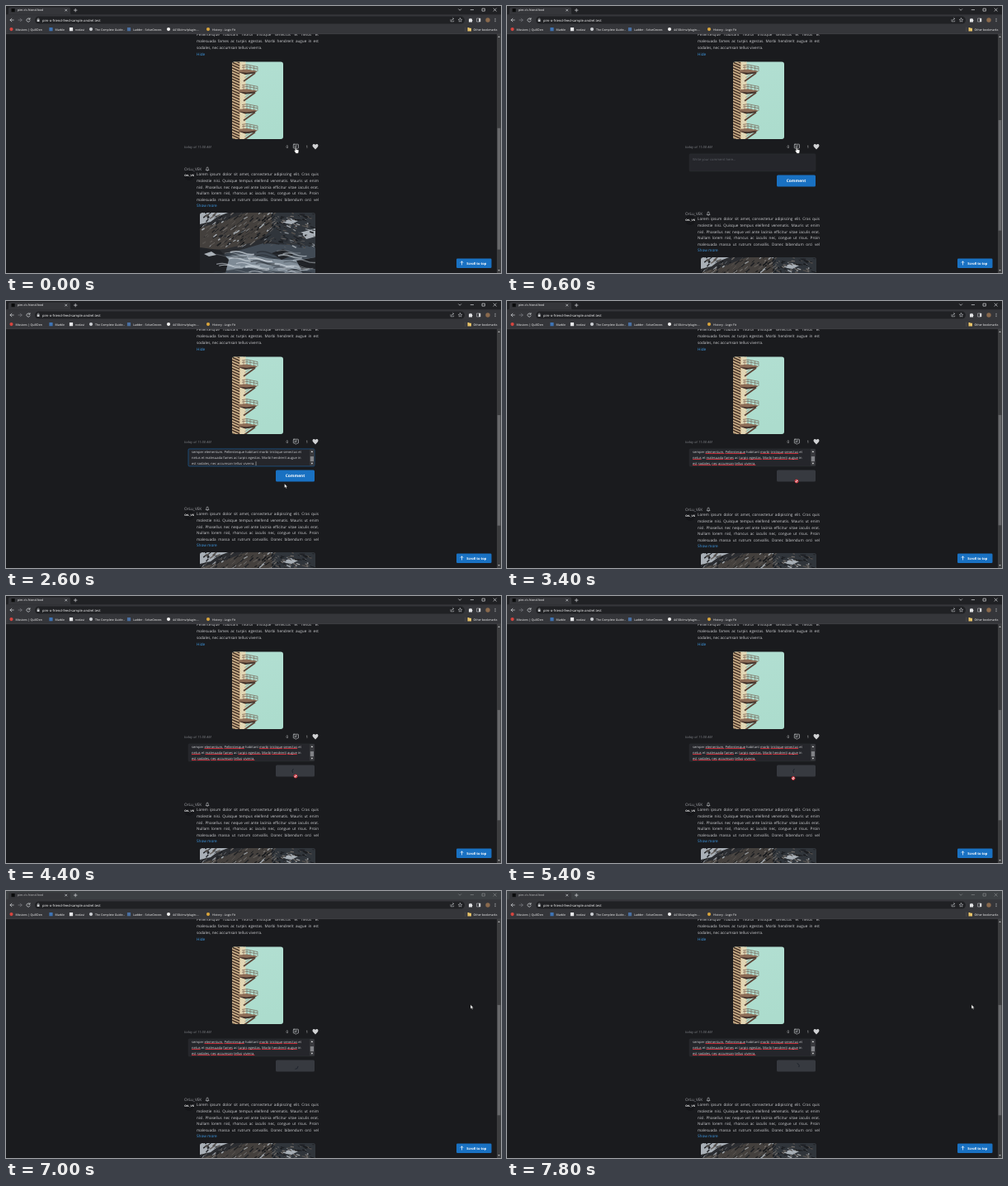
These frames come from a looping animation (600x323 px, 8 s). An HTML page:

```html
<!DOCTYPE html>
<html lang="en">
<head>
<meta charset="utf-8">
<title>Comment form</title>
<style>
  html, body { margin: 0; width: 100%; height: 100%; overflow: hidden; background: #1a1b1e; }
  svg { display: block; width: 600px; height: 323px; }
  svg, svg div { font-family: "Open Sans", "Noto Sans", sans-serif; font-weight: 500; text-rendering: geometricPrecision; }
  text { font-size: 4.1px; fill: #d0d1d4; white-space: pre; }
  foreignObject { overflow: visible; }
  .chrome text { font-size: 3.52px; fill: #fff; }
  .chrome .url { font-size: 4.1px; }
  .body { font-size: 4.7px; }
  .link { font-size: 4.7px; fill: #3f9be6; }
  .bold { font-weight: 700; fill: #fff; }
  .line { fill: none; stroke: #d5d7da; stroke-width: .7; stroke-linecap: round; stroke-linejoin: round; }
  .para div { font-size: 4.64px; line-height: 7.75px; color: #d0d1d4; white-space: nowrap; }
  .para .full { text-align: justify; text-align-last: justify; }
  #typed div { font-size: 4.07px; line-height: 6.85px; color: #d0d1d4; white-space: nowrap; }
  #typed.sent .miss { text-decoration: underline #bd2c38 .4px; text-underline-offset: .4px; text-decoration-skip-ink: none; }
</style>
</head>
<body>
<svg viewBox="0 0 600 323">
  <defs>
    <linearGradient id="sky" x1="0" y1="0" x2=".2" y2="1">
      <stop offset="0" stop-color="#b2dfd2"/><stop offset="1" stop-color="#acdccd"/>
    </linearGradient>
    <clipPath id="tallClip"><rect x="274" y="67.4" width="62" height="93.6" rx="3"/></clipPath>
    <clipPath id="wideClip"><rect x="235" y="250" width="140" height="94" rx="3"/></clipPath>
    <clipPath id="foldClip"><rect id="fold" x="210" y="175" width="180" height="0"/></clipPath>
    <clipPath id="areaClip"><rect x="221" y="179" width="153" height="20.6"/></clipPath>
    <g id="stairs">
      <path d="M302 81 L288 91" stroke="#5d4639" stroke-width="1.8"/>
      <path d="M303 77 L289 87" stroke="#a07d66" stroke-width=".6"/>
      <path d="M282 77.5 L292 76.5 L305 79 L301 81.2 L290 82.5 L282 80.5Z" fill="#8d6d57"/>
      <path d="M282 80 L292 80.8 L304 79.4 L300 81.6 L290 83Z" fill="#40302a"/>
      <path d="M286 72 L292 71 L305 73.6 M286 74.5 L292 73.6 L305 76" stroke="#6b4f41" stroke-width=".6"/>
      <path d="M288 72v6 M292 71v6 M296 72v6 M300.500 73v6 M305 73.600v5.400" stroke="#6b4f41" stroke-width=".5"/>
    </g>
  </defs>
  <rect width="600" height="323" fill="#1a1b1e"/>

  <!-- first post -->
  <foreignObject class="para" id="para1" x="231" y="32.2" width="148" height="24"/>
  <text class="link" x="231" y="60">Hide</text>
  <g clip-path="url(#tallClip)" fill="none">
    <rect x="274" y="67" width="62" height="95" fill="url(#sky)"/>
    <path d="M274 67h10v95h-10z" fill="#cfb58e"/>
    <path d="M284 67h6.500v95h-6.500z" fill="#e2d6b4"/>
    <path d="M0-8v110" transform="translate(278.500 67) skewY(24)" stroke="#4a3529" stroke-width="9" stroke-dasharray="1.700 1.700"/>
    <use href="#stairs" y="-23.8"/><use href="#stairs"/><use href="#stairs" y="23.8"/>
    <use href="#stairs" y="47.6"/><use href="#stairs" y="71.4"/>
  </g>
  <text x="216" y="171.5" font-style="italic" style="fill:#7d7f84">today at 11:00 AM</text>
  <text class="body" x="339.5" y="171.8">0</text>
  <path class="line" d="M349 167.200h4.800q.7 0 .7.7v3.500q0 .7-.7.7h-1.200l-1.200 1.300-1.200-1.300h-1.200q-.7 0-.7-.7v-3.500q0-.7.7-.7z M350 169h2.800 M350 170.500h1.800" style="stroke-width:.6"/>
  <text class="body" x="363.4" y="171.8">1</text>
  <path d="M375 173.400l-2.600-2.600c-2.500-2.600 1-5.200 2.600-2.700 1.600-2.500 5.100.1 2.600 2.700z" fill="#d0d1d3"/>

  <!-- comment form -->
  <g id="form" clip-path="url(#foldClip)">
    <rect id="area" x="221" y="178.9" width="153" height="21" rx="1.2" fill="#25262b" stroke-width=".5"/>
    <text id="hint" x="225" y="187.2" style="fill:#5f6269">Write your comment here...</text>
    <g id="entry" clip-path="url(#areaClip)">
      <foreignObject id="typed" x="225" y="181" width="143" height="21"/>
      <rect x="368.2" y="179.3" width="5.4" height="20" fill="#3a3b3f"/>
      <rect x="368.8" y="188" width="4.2" height="6" fill="#818286"/>
      <path d="M369.6 183l1.3-1.7 1.3 1.7z M369.6 195.7l1.3 1.7 1.3-1.7z" fill="#e0e0e0"/>
    </g>
    <path id="caret" stroke="#e4e5e7" stroke-width=".5"/>
    <rect id="button" x="327" y="204.6" width="47" height="14" rx="1.5"/>
    <text id="label" class="bold" x="350.5" y="212.9" text-anchor="middle" style="font-size:4.8px">Comment</text>
    <path id="loader" d="M350.5 208.4a3.5 3.5 0 0 1 3.5 3.5" fill="none" stroke="#1d232b" stroke-width=".9"/>
  </g>

  <!-- second post -->
  <g id="post">
    <text class="body" x="216" y="198.5" style="fill:#a6a7ab">OrLu_VEK</text>
    <path class="line" d="M242.4 198.2q.7-.8.7-2 0-1.300 1-1.300t1 1.300q0 1.200.7 2z M243.700 199.200h.8" style="stroke-width:.55"/>
    <circle cx="222" cy="205" r="6" fill="#151619"/>
    <text class="bold" x="222" y="206.3" text-anchor="middle" style="font-size:3.3px">OrL_VK</text>
    <foreignObject class="para" id="para2" x="231" y="201.2" width="148" height="39"/>
    <text class="link" x="231" y="242.8">Show more</text>
    <g clip-path="url(#wideClip)" id="river">
      <rect x="235" y="250" width="140" height="94" fill="#2b2d31"/>
      <path d="M235 268l24-6 32-12h42l-8 22-26 14-34 8-30 2z" fill="#44403d"/>
      <path d="M322 250h53v44l-34-4-30-8 12-14z" fill="#30353b"/>
      <path d="M240 306l38-9 34-10 63 4v53h-140z" fill="#414a54"/>
      <path d="M262 304q24-6 40-2t32 5 41-3v14q-38 7-60 1t-53 2z" fill="#7f8b96"/>
      <path d="M235 292l24 3 11 12-6 24h-29z M322 299l14-5 13 7-15 6z M352 308l23-4v14l-17 1z" fill="#202226"/>
      <path d="M235 250h34l-13 5-8 6-13 3z M334 262l11-5 9 3-8 4z M357 274l18-5v10l-11 3z M240 300l9-3 6 4-9 2z" fill="#a9b0b7"/>
    </g>
  </g>

  <!-- page overlay -->
  <rect x="546" y="305.5" width="42.5" height="11.5" rx="1.3" fill="#1971c2"/>
  <path class="line" style="stroke:#fff" d="M552.5 313v-4 M551.1 310.4l1.4-1.5 1.4 1.5"/>
  <text class="bold" x="570.3" y="312.8" text-anchor="middle" style="font-size:4.05px">Scroll to top</text>
  <rect x="595" y="34" width="5" height="289" fill="#3c3d3f"/>
  <rect id="thumb" x="595.7" width="3.6" fill="#68696b"/>
  <path d="M596.2 38l1.3-1.8 1.3 1.8z M596.2 319l1.3 1.8 1.3-1.8z" fill="#b4b5b7"/>

  <!-- browser window -->
  <g class="chrome">
    <rect id="frame" width="600" height="11"/>
    <path d="M1 10.5q2 0 2-2v-5q0-2 2-2h71q2 0 2 2v5q0 2 2 2z" fill="#35363a"/>
    <rect y="10.3" width="600" height="23.7" fill="#35363a"/>
    <rect y="33.6" width="600" height=".5" fill="#46474b"/>
    <rect x="6.5" y="3" width="4.2" height="4.2" fill="#0c0d0e"/>
    <text id="title" x="14" y="6.4">pim-o's friend-feed</text>
    <path class="line" d="M71.7 4.1l2 2m0-2l-2 2 M82.4 5.1h3.6m-1.8-1.8v3.6"/>
    <path id="controls" class="line" d="M548.6 3.8l1.5 1.5 1.5-1.5 M563.2 4.6h3.4 M577.4 3.1h3v3h-3z M591 3l3.2 3.2m0-3.2l-3.2 3.2"/>
    <rect x="35" y="12.6" width="521" height="9" rx="4.5" fill="#202124"/>
    <path class="line" d="M9.2 17h-4.2m1.9-1.9l-1.9 1.9 1.9 1.9 M28.9 16a2.1 2.1 0 1 0 .1 1.9 M29 14.6v1.5h-1.5"/>
    <path class="line" style="stroke:#808287" d="M15 17h4.2m-1.9-1.9l1.9 1.9-1.9 1.9"/>
    <path d="M37.7 16.5h2.8v2.4h-2.8z" fill="#d5d7da"/>
    <path class="line" style="stroke-width:.5" d="M38.3 16.5v-.8q0-.9.8-.9t.8.9v.8 M539 16.5v2.3h3.7v-1 M540.3 17.3q.3-2 2.3-2m-1-1l1.1 1-1.1 1 M550.5 14.7l.7 1.5 1.6.2-1.2 1.1.3 1.6-1.4-.8-1.4.8.3-1.6-1.2-1.1 1.6-.2z M571 15h4v4h-4z"/>
    <text class="url" x="44" y="18.6">pim-o-friend-feed-sample.ondrel.test</text>
    <path d="M561 15.6h1.2q.8-1.8 1.6 0h1.2v1.3q1.5.6 0 1.4v1.2h-4z M573.2 15h1.8v4h-1.8z" fill="#e3e4e6"/>
    <circle cx="584" cy="17" r="2.7" fill="#8b6a4d"/>
    <path class="line" style="stroke-width:1" d="M593 15.3v.01m0 1.69v.01m0 1.69v.01"/>
    <g id="marks"/>
    <path d="M556.7 25.5v5.5" stroke="#5b5d61" stroke-width=".5"/>
    <path d="M559.5 26h1.7l.6.7h2.2v3.7h-4.5z" fill="#e9c468"/>
    <text x="566.5" y="29.5">Other bookmarks</text>
  </g>

  <g id="pointer">
    <path id="arrow" d="M0 0v5l1.2-1 .8 1.8.9-.4-.8-1.7h1.5z" fill="#fff" stroke="#111" stroke-width=".35"/>
    <path id="hand" d="M.6 0q.7 0 .7.8v1.7l2.4.5q.8.2.7 1.1l-.4 2.5q-.1.7-.8.7h-1.9q-.5 0-.8-.5l-1.7-2.6q-.2-.8.6-.6l.5.5v-3.3q0-.8.7-.8z" fill="#fff" stroke="#111" stroke-width=".4"/>
    <path id="beam" d="M-.9-2.7h1.8m-.9 0v5.4m-.9 0h1.8" fill="none" stroke="#e8e8e8" stroke-width=".5"/>
    <g id="deny"><circle r="2" fill="#fff" stroke="#c5202b" stroke-width="1"/><path d="M-1.400-1.400l2.800 2.800" stroke="#c5202b"/></g>
  </g>
</svg>
<script>
const $ = id => document.getElementById(id);
const LOOP = 8000, STEP = 200;

const addLines = (id, lines) => {
  $(id).innerHTML = lines.map(l => `<div class="${/viverra\.$/.test(l) ? '' : 'full'}">${l}</div>`).join('');
};
addLines('para1', [
  'Pellentesque habitant morbi tristique senectus et netus et',
  'malesuada fames ac turpis egestas. Morbi hendrerit augue in est',
  'sodales, nec accumsan tellus viverra.'
]);
addLines('para2', [
  'Lorem ipsum dolor sit amet, consectetur adipiscing elit. Cras quis',
  'molestie nisi. Quisque tempus eleifend venenatis. Mauris ut enim',
  'nisl. Phasellus nec neque vel ante lacinia efficitur vitae iaculis erat.',
  'Nullam lorem nisl, rhoncus ac iaculis nec, congue ut risus. Proin',
  'malesuada massa ut rutrum convallis. Donec bibendum orci vel'
]);

const correct = ['semper', 'habitant', 'et', 'in', 'ac'];
$('typed').innerHTML = [
  'semper elementum. Pellentesque habitant morbi tristique senectus et',
  'netus et malesuada fames ac turpis egestas. Morbi hendrerit augue in',
  'est sodales, nec accumsan tellus viverra.'
].map(l => '<div>' + l.split(' ').map(w =>
  correct.includes(w) ? w : `<span class="miss">${w}</span>`).join(' ') + '</div>').join('');

// bookmark: icon x, colour, rounded, label
$('marks').innerHTML = [
  [6.5, '#d6453f', 1, 'Missions | QuillDen'],
  [54.5, '#3f74b5', 0, 'Marble'],
  [79, '#e6e7e9', 0, 'nodavi'],
  [103, '#c9ccd0', 1, 'The Complete Guide...'],
  [149, '#4a6fa0', 0, 'Ladder - SolveGroves'],
  [197, '#f0f0f0', 1, '4410k/rnv/plugin-...'],
  [245, '#d9a53c', 1, 'History - Logic Fit']
].map(([x, c, round, label]) =>
  `<rect x="${x - 2.1}" y="26" width="4.2" height="4.2" rx="${round ? 2.1 : .3}" fill="${c}"/>` +
  `<text x="${x + 5}" y="29.5">${label}</text>`).join('');

// rock grain and flowing water
let seed = 11;
const rnd = () => (seed = seed * 16807 % 2147483647) / 2147483647;
const tones = ['#17191c', '#6e6a67', '#222428', '#a3a9af', '#1c1e22', '#54504d'];
let grain = '', foam = '';
for (let i = 0; i < 330; i++) {
  const x = 235 + rnd() * 140, y = 250 + rnd() * 42, n = 1.5 + rnd() * 4.5;
  const slope = (x < 325 ? -.75 : .3) + rnd() * .5 - .25;
  grain += `<path d="M${x} ${y}l${n} ${slope * n}" stroke="${tones[i % 6]}" stroke-width="${.4 + rnd() * 1.3}"/>`;
}
for (let i = 0; i < 48; i++) {
  const x = 248 + rnd() * 100, y = 294 + rnd() * 32;
  foam += `<path d="M${x} ${y}q8 -2.5 15 .5t14 2" fill="none" stroke="${i % 3 ? '#cdd5dc' : '#272c33'}" stroke-opacity="${.3 + rnd() * .5}" stroke-width="${.5 + rnd() * 1.4}"/>`;
}
$('river').insertAdjacentHTML('beforeend', grain + foam);

// pointer: time, x, y, shape
const moves = [
  [0, 350.5, 171, 'hand'], [1000, 338, 185, 'beam'], [1200, 318, 190, 'beam'],
  [1800, 322, 196, 'beam'], [2000, 328, 204, 'arrow'], [2200, 333, 215, 'arrow'],
  [2600, 337.5, 221, 'arrow'], [2800, 349, 215, 'hand'], [3200, 351, 218, 'deny'],
  [4600, 349, 219, 'deny'], [5000, 347, 220.5, 'deny'], [5800, 370, 204, 'arrow'],
  [6000, 393.5, 185.5, 'arrow'], [6200, 438, 170, 'arrow'], [6400, 494, 154, 'arrow'],
  [6600, 540, 142, 'arrow'], [6800, 563, 137.5, 'arrow']
];

const show = (id, on) => $(id).setAttribute('visibility', on ? 'inherit' : 'hidden');
const set = (id, attrs) => { for (const k in attrs) $(id).setAttribute(k, attrs[k]); };

function render(t) {
  const shift = t < 400 ? 0 : t < 600 ? 30 : t < 3200 ? 54 : 55;
  const filled = t >= 1600, sent = t >= 3200, focus = t >= 1200 && !sent;
  const active = t < 5800;
  const pageH = 545 + shift;

  set('post', { transform: `translate(0 ${shift})` });
  set('fold', { height: shift });
  set('form', { opacity: shift === 30 ? .5 : 1 });
  set('thumb', { y: 40 + 277 * 212 / pageH, height: 277 * 289 / pageH });

  set('area', { stroke: focus ? '#1971c2' : '#2c2e33' });
  show('hint', !filled);
  show('entry', filled);
  show('caret', focus);
  set('caret', { d: filled ? 'M303 194.2v4.8' : 'M225 183.2v4.8' });
  $('typed').classList.toggle('sent', sent);

  set('button', { fill: sent ? '#373a40' : '#1971c2' });
  show('label', !sent);
  show('loader', t >= 3600);
  set('loader', { transform: `rotate(${(t - 5400) * .36 - 125} 350.5 211.9)` });

  set('frame', { fill: active ? '#202124' : '#3c4043' });
  set('controls', { opacity: active ? 1 : .45 });
  set('title', { opacity: active ? 1 : .7 });

  const [, x, y, shape] = moves.filter(m => m[0] <= t).pop();
  set('pointer', { transform: `translate(${x} ${y})` });
  for (const s of ['arrow', 'hand', 'beam', 'deny']) show(s, s === shape);
}

let start;
function tick(now) {
  start ??= now;
  render(Math.floor((now - start) % LOOP / STEP) * STEP);
  requestAnimationFrame(tick);
}
render(0);
requestAnimationFrame(tick);
</script>
</body>
</html>
```
